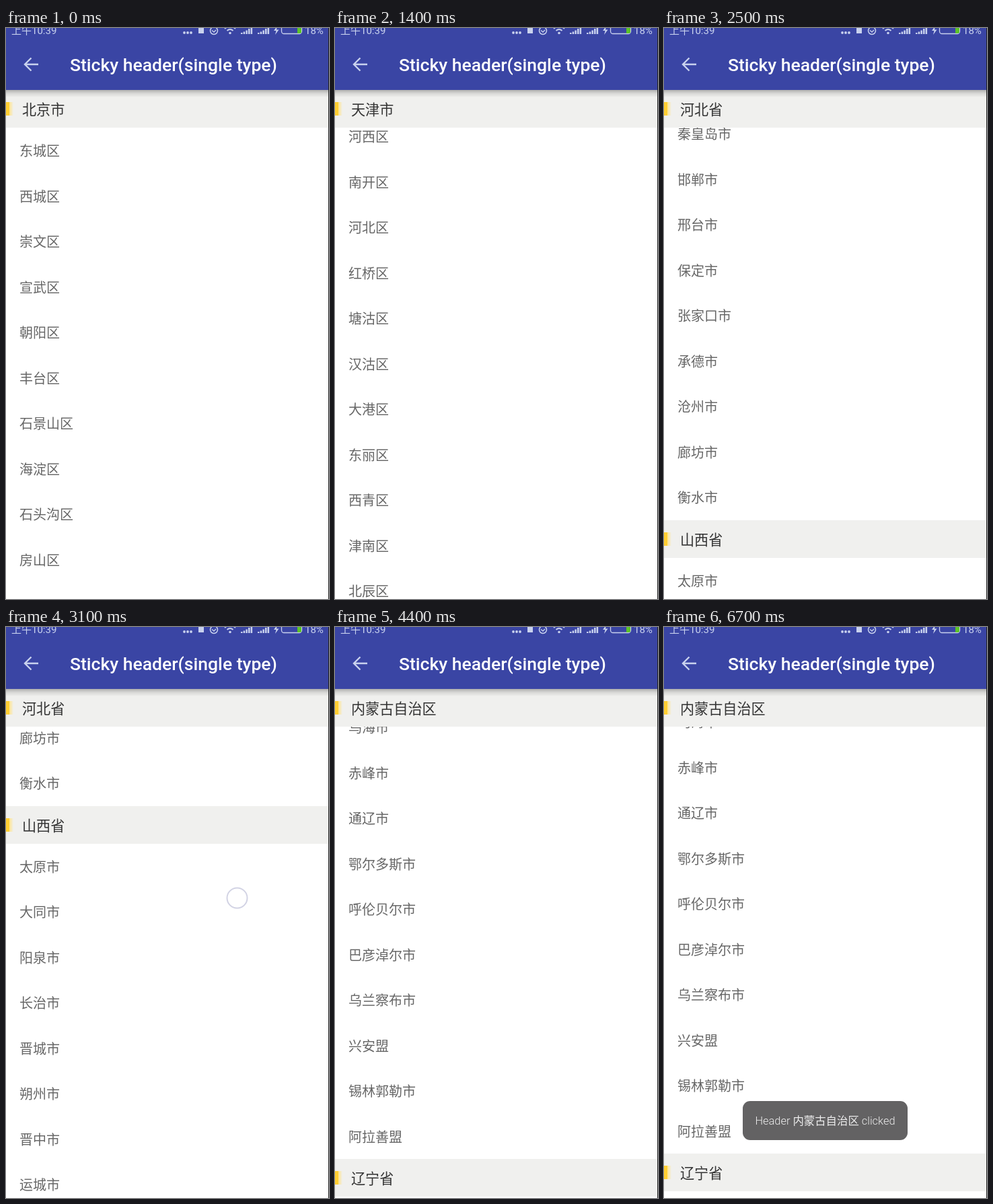
An HTML page for the animation above (6800 ms loop, 480x848 px).

```html
<!DOCTYPE html>
<html lang="zh-CN">
<head>
<meta charset="utf-8">
<title>Sticky header</title>
<style>
  html, body { margin: 0; width: 100%; height: 100%; overflow: hidden; background: #fff; }
  #stage { position: relative; width: 480px; height: 848px; overflow: hidden; background: #fff;
    font-family: "Noto Sans CJK SC", "Noto Sans CJK", "Noto Sans", sans-serif; }
  #bar { position: absolute; left: 0; top: 0; width: 480px; height: 92px; background: #3a45a4; }
  #shade { position: absolute; left: 0; top: 92px; width: 480px; height: 11px;
    background: linear-gradient(rgba(0,0,0,.27), rgba(0,0,0,.1) 45%, rgba(0,0,0,0)); }
  #bar svg { position: absolute; left: 0; top: 0; }
  #bar h1 { position: absolute; left: 95px; top: 35px; margin: 0; color: #fff; white-space: nowrap;
    font: 500 26.5px/40px Roboto, sans-serif; }
  .status { position: absolute; top: -6px; color: #c9d2ee; white-space: nowrap;
    font: 400 15px/20px Roboto, "Noto Sans CJK SC", sans-serif; }
  #list { position: absolute; left: 0; top: 92px; width: 480px; height: 756px; overflow: hidden;
    isolation: isolate; }
  section { position: relative; }
  h2 { position: sticky; top: 0; z-index: 1; margin: 0; height: 56px; padding-left: 24px;
    background: #f0f0ee; color: #333; font-size: 21.1px; font-weight: 400; line-height: 56px; }
  h2::before { content: ""; position: absolute; left: 0; top: 18px; width: 11px; height: 20px;
    background: linear-gradient(90deg, #ffcf33 5px, #ffe48a 5px, #f0f0ee 11px); }
  p { margin: 0; height: 67.5px; padding-left: 20px; color: #666; font-size: 20px; line-height: 67px; }
  #edge { position: absolute; right: 0; top: 0; width: 1px; height: 848px; background: #222; }
  #touch { position: absolute; left: -16px; top: -16px; width: 28px; height: 28px;
    border: 2px solid #d2d3e4; border-radius: 50%; }
  #toast { position: absolute; left: 117px; top: 704px; width: 245px; height: 58px; border-radius: 11px;
    background: #636263; color: #eee; text-align: center; white-space: nowrap;
    font: 300 16.4px/59px Roboto, "Noto Sans CJK SC", sans-serif; }
</style>
</head>
<body>
<div id="stage">
  <div id="list"></div>
  <div id="shade"></div>
  <div id="bar">
    <span class="status" style="left:8px">上午10:39</span>
    <span class="status" style="left:444px">18%</span>
    <svg width="480" height="92" fill="none" stroke="#c9d2ee">
      <path d="M48 54H28M37.5 44.5L28 54l9.5 9.5" stroke-width="2.4"/>
      <g fill="#c9d2ee" stroke="none">
        <circle cx="265" cy="7" r="1.9"/><circle cx="270" cy="7" r="1.9"/><circle cx="275" cy="7" r="1.9"/>
        <rect x="286" y="0" width="8" height="8"/>
        <path id="cell" d="M349 9V7h2.5v2zM352.7 9V5.5h2.5V9zM356.4 9V3.5h2.5V9zM360 9V1h2.5v8zM363.6 9V-2h2.5V9z"/>
        <use href="#cell" x="25"/>
        <path d="M403-3l-5 7h3.5l-1.5 6 5.5-7.5H402z"/>
        <circle cx="333" cy="7.5" r="1.8"/>
      </g>
      <circle cx="309" cy="4" r="5.5" stroke-width="1.5"/>
      <path d="M306 3.5l3 2.5 3-3" stroke-width="1.4"/>
      <path d="M328.5 4q4.5-4 9 0M325 1q8-6.5 16 0" stroke-width="1.8"/>
      <rect x="409.5" y="-4" width="30" height="12.5" rx="3.5" stroke-width="1.3"/>
      <path d="M433-3h4q2 0 2 2v7q0 2-2 2h-4z" fill="#5cc428" stroke="none"/>
    </svg>
    <h1>Sticky header(single type)</h1>
  </div>
  <div id="toast">Header 内蒙古自治区 clicked</div>
  <div id="touch"></div>
  <div id="edge"></div>
</div>
<script>
  const regions = {
    北京市: '东城区 西城区 崇文区 宣武区 朝阳区 丰台区 石景山区 海淀区 石头沟区 房山区 通州区 顺义区 昌平区 大兴区 平谷区 怀柔区 密云县 延庆县',
    天津市: '和平区 河东区 河西区 南开区 河北区 红桥区 塘沽区 汉沽区 大港区 东丽区 西青区 津南区 北辰区 武清区 宝坻区 宁河县 静海县 蓟县',
    河北省: '石家庄市 唐山市 秦皇岛市 邯郸市 邢台市 保定市 张家口市 承德市 沧州市 廊坊市 衡水市',
    山西省: '太原市 大同市 阳泉市 长治市 晋城市 朔州市 晋中市 运城市 忻州市 临汾市 吕梁市',
    内蒙古自治区: '呼和浩特市 包头市 乌海市 赤峰市 通辽市 鄂尔多斯市 呼伦贝尔市 巴彦淖尔市 乌兰察布市 兴安盟 锡林郭勒市 阿拉善盟',
    辽宁省: '沈阳市 大连市 鞍山市 抚顺市'
  };
  const $ = id => document.getElementById(id);
  const list = $('list'), touch = $('touch'), toast = $('toast');
  list.innerHTML = Object.entries(regions).map(([name, items]) =>
    `<section><h2>${name}</h2>${items.split(' ').map(i => `<p>${i}</p>`).join('')}</section>`).join('');

  const LOOP = 6800, TICK = 100;
  // Each swipe: finger down, release, fling end; scroll at those times; fling power; finger x, y
  const swipes = [
    { down: 500, up: 1000, end: 2100, from: 0, mid: 200, to: 1853, pow: 3, x: 358.5, y: 638 },
    { down: 2100, up: 2300, end: 3000, from: 1853, mid: 1990, to: 3110, pow: 3, x: 350, y: 520 },
    { down: 3000, up: 3200, end: 4900, from: 3110, mid: 3336, to: 4315, pow: 3.93, x: 343.5, y: 459 }
  ];
  const clamp = v => Math.min(1, Math.max(0, v));

  function scrollAt(t, s) {
    if (t < s.up) return s.from + (s.mid - s.from) * clamp((t - s.down) / (s.up - s.down)) ** 2;
    const rest = 1 - clamp((t - s.up) / (s.end - s.up));
    return s.to - (s.to - s.mid) * rest ** s.pow;
  }

  function draw(t) {
    const s = swipes.filter(w => t >= w.down).pop() || swipes[0];
    const pos = scrollAt(t, s);
    list.scrollTop = Math.round(pos);
    const held = t >= s.down && t < s.up;
    touch.style.visibility = held ? 'visible' : 'hidden';
    touch.style.transform = `translate(${s.x}px, ${s.y - pos + s.from}px)`;
    toast.style.opacity = clamp((t - 5100) / 300);
  }

  const start = performance.now();
  function loop() {
    const t = (performance.now() - start) % LOOP;
    draw(Math.floor(t / TICK) * TICK);
    requestAnimationFrame(loop);
  }
  loop();
</script>
</body>
</html>
```
